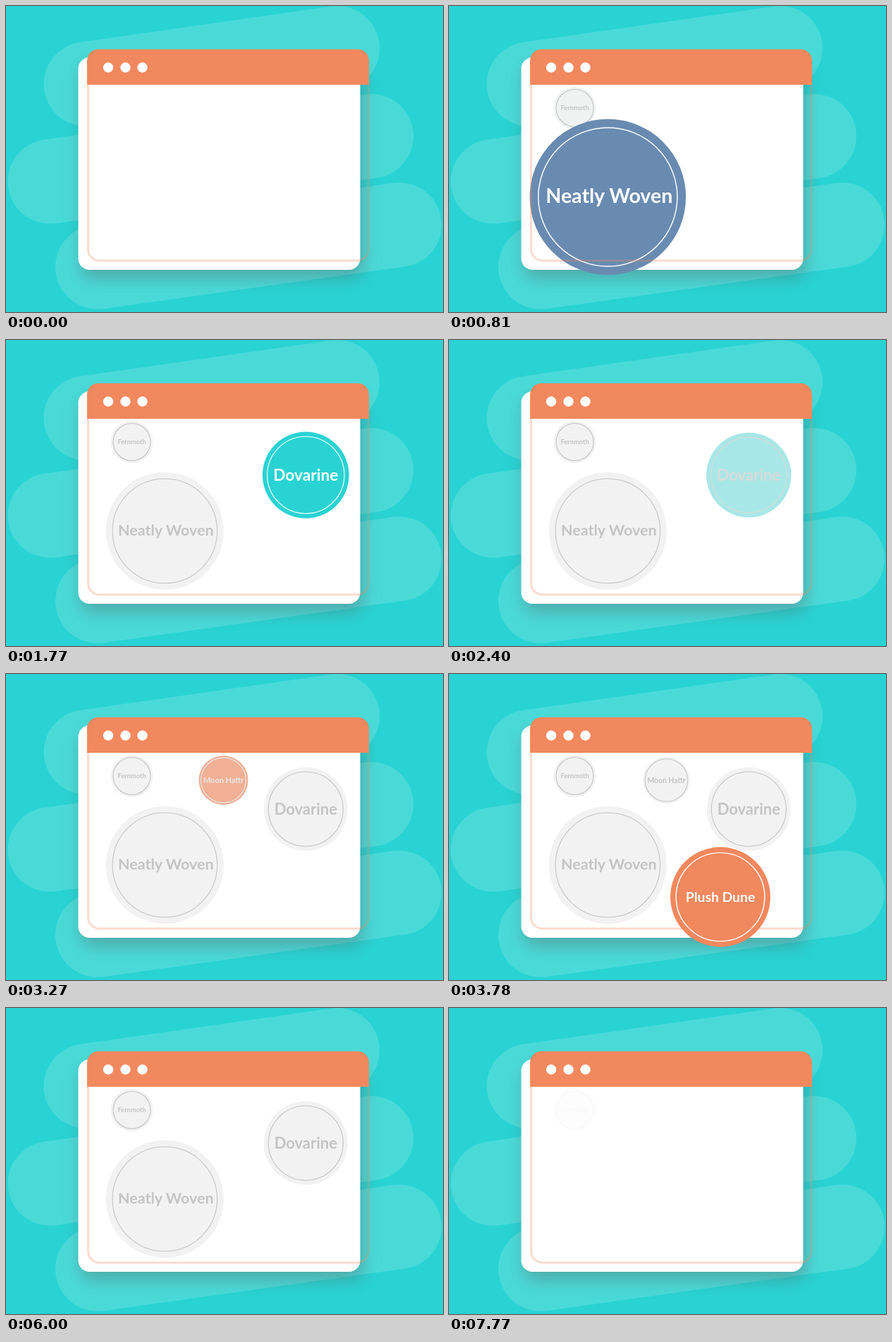
Recreate the animation shown at these times as an HTML page. Size 620 by 435 pixels, loop 8100 ms.

```html
<!DOCTYPE html>
<html lang="en">
<head>
<meta charset="utf-8">
<title>Bubbles in a browser window</title>
<style>
  html, body { margin: 0; width: 100%; height: 100%; overflow: hidden; background: #29d3d3; }
  svg { display: block; width: 620px; height: 435px; }
  text { font-family: Lato, sans-serif; font-weight: 700; text-anchor: middle; }
  .window { filter: drop-shadow(4px 12px 12px rgba(90, 90, 90, .38)); }
</style>
</head>
<body>
<svg viewBox="0 0 620 435">
  <rect width="620" height="435" fill="#29d3d3"/>
  <path d="M113.5 111L470 60M62.5 249.5L518 185M130 371L558 311"
        fill="none" stroke="#49dad8" stroke-width="120" stroke-linecap="round"/>
  <rect class="window" x="102.5" y="73" width="400" height="302" rx="16" fill="#fff"/>
  <g id="bubbles"></g>
  <path d="M116.5 112V346a16 16 0 0 0 16 16H498a16 16 0 0 0 16 -16V112"
        fill="none" stroke="#f2885e" stroke-opacity=".3" stroke-width="3"/>
  <path d="M115 112V77.500a16 16 0 0 1 16 -16H499a16 16 0 0 1 16 16V112Z" fill="#f2885e"/>
  <g fill="#fff">
    <circle cx="145" cy="87.500" r="7.200"/>
    <circle cx="169.500" cy="87.500" r="7.200"/>
    <circle cx="193.500" cy="87.500" r="7.200"/>
  </g>
</svg>
<script>
const LOOP = 8100, LAST_CHANGE = 7770, PEAK = 1.365;
const GRAY = [242, 242, 242], INK = [196, 196, 196], WHITE = [255, 255, 255];
const TEAL = [41, 211, 211], BLUE = [105, 139, 177], ORANGE = [242, 136, 94];

// start: pop-in time, speed: pace of the entrance, out: fade-out interval
const bubbles = [
  { label: 'Fernmoth', x: 178.5, y: 145, r: 30, ring: 26.5, size: 9.3, color: TEAL, start: 0, speed: 1.17, out: [7650, 7830] },
  { label: 'Neatly Woven', x: 225.3, y: 271.5, r: 83.5, ring: 74.3, size: 21.5, dx: 1.5, dy: -1.5, color: BLUE, start: 610, out: [7030, 7170] },
  { label: 'Dovarine', x: 425.3, y: 192, r: 59.5, ring: 53, size: 22, color: TEAL, start: 1620, out: [6430, 6570] },
  { label: 'Moon Hattr', x: 308.5, y: 151, r: 33.2, ring: 30.3, size: 10.4, color: ORANGE, start: 2570, out: [5830, 6000] },
  { label: 'Plush Dune', x: 385, y: 317, r: 52.5, ring: 46.5, size: 14.3, color: ORANGE, start: 3450, out: [4600, 5300] }
];

const progress = (t, from, to) => Math.min(1, Math.max(0, (t - from) / (to - from)));
const ease = u => (1 - Math.cos(Math.PI * u)) / 2;
const mix = (a, b, u) => `rgb(${a.map((v, i) => Math.round(v + (b[i] - v) * u))})`;

function add(parent, tag, attrs) {
  const node = document.createElementNS('http://www.w3.org/2000/svg', tag);
  for (const key in attrs) node.setAttribute(key, attrs[key]);
  return parent.appendChild(node);
}

for (const b of bubbles) {
  b.group = add(document.getElementById('bubbles'), 'g', {});
  b.disc = add(b.group, 'circle', { r: b.r });
  b.line = add(b.group, 'circle', { r: b.ring, fill: 'none', 'stroke-width': 1.1 });
  b.text = add(b.group, 'text', { x: b.dx || 0, y: (b.dy || 0) + b.size * .35, 'font-size': b.size });
  b.text.textContent = b.label;
}

function draw(time) {
  const t = Math.min(time, LAST_CHANGE);
  for (const b of bubbles) {
    const age = (t - b.start) * (b.speed || 1);
    const grow = ease(progress(age, 0, 225));
    const settle = ease(progress(age, 260, 850));
    const fade = ease(progress(age, 500, 980));
    const scale = PEAK * grow - (PEAK - 1) * settle;
    const opacity = age > 0 ? (1 - progress(t, ...b.out)) ** 2 : 0;
    const ink = mix(WHITE, INK, fade);
    b.group.setAttribute('transform', `translate(${b.x} ${b.y}) scale(${scale})`);
    b.group.setAttribute('opacity', opacity);
    b.disc.setAttribute('fill', mix(b.color, GRAY, fade));
    b.line.setAttribute('stroke', ink);
    b.text.setAttribute('fill', ink);
  }
}

function tick() {
  draw(performance.now() % LOOP);
  requestAnimationFrame(tick);
}
tick();
</script>
</body>
</html>
```
